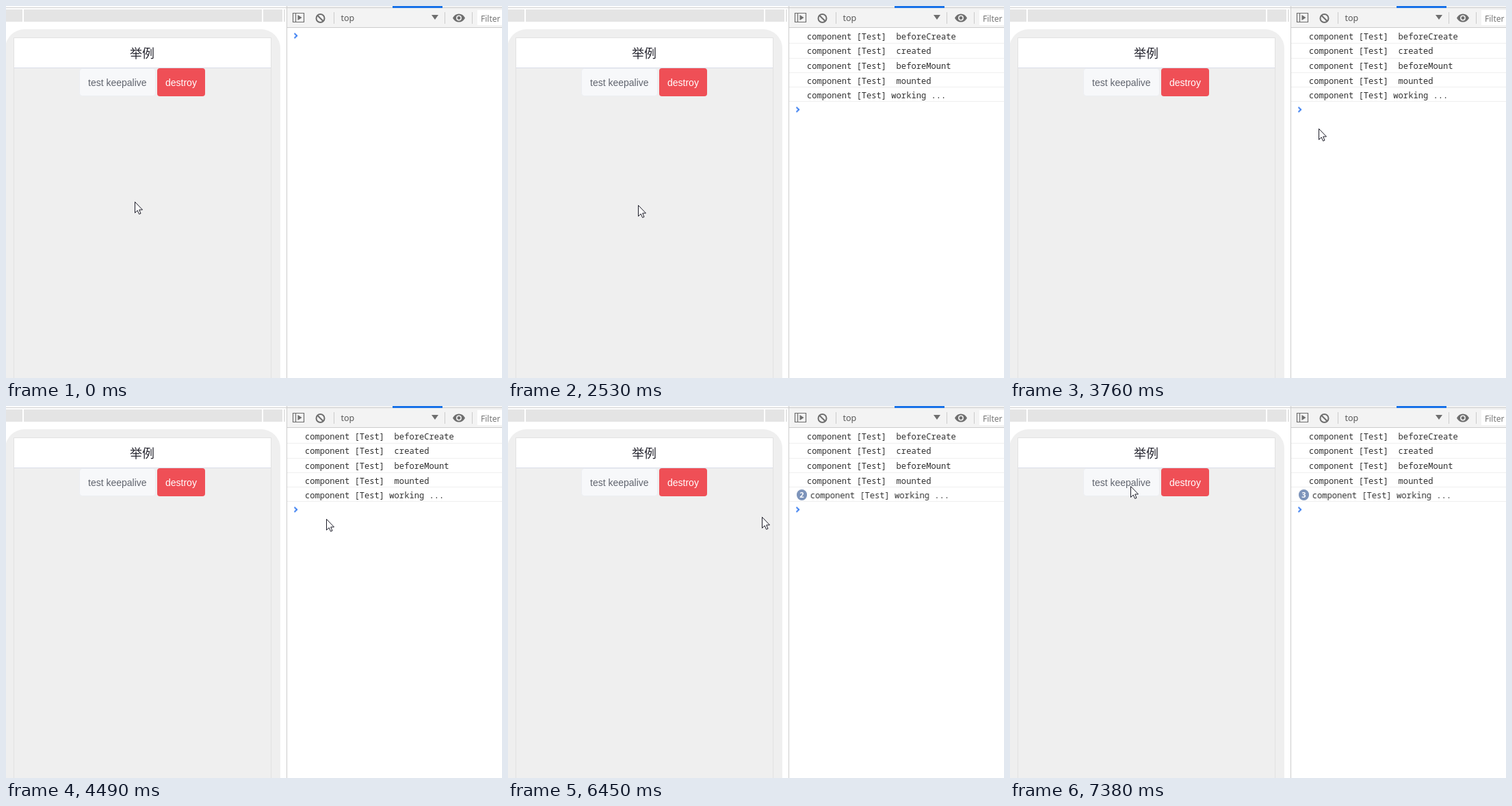
These frames come from a looping animation (725 px wide and 544 px high, 8000 ms). An HTML page:

```html
<!DOCTYPE html>
<html lang="zh-CN">
<head>
<meta charset="utf-8">
<title>Keep-alive demo</title>
<style>
html, body { margin: 0; width: 100%; height: 100%; overflow: hidden; background: #fff; }
svg { display: block; width: 725px; height: 544px; }
text { white-space: pre; }
.btn { font: 14px "Liberation Sans", Arial, sans-serif; }
.title { font: 300 18px "Noto Sans CJK SC", "Noto Sans CJK", sans-serif; fill: #25252f; }
.bar { font: 12.5px "Noto Sans", sans-serif; fill: #5a5a5a; }
.log { font: 12.1px "Noto Sans Mono", monospace; fill: #303030; }
.badge { font: bold 11px "Noto Sans", sans-serif; fill: #fff; text-anchor: middle; }
.rule { stroke: #efefef; }
.icon { fill: none; stroke: #6e6e6e; }

/* every part shares one 8 s clock and changes in hard steps */
.step { animation: 8s step-end infinite; }
#mount { animation-name: mount; }
#work { animation-name: work; }
#shift { animation-name: shift; }
#count { animation-name: count; }
#two { animation-name: two; }
#three { animation-name: three; }
#prompt { animation-name: prompt; }
#cursor { animation-name: cursor; }

@keyframes mount { 0% { opacity: 0 } 1.5%, 100% { opacity: 1 } }
@keyframes work { 0% { opacity: 0 } 31.625%, 100% { opacity: 1 } }
@keyframes shift { 0% { transform: none } 60.75%, 100% { transform: translateX(4.7px) } }
@keyframes count { 0% { opacity: 0 } 60.75%, 100% { opacity: 1 } }
@keyframes two { 0% { opacity: 1 } 92.25%, 100% { opacity: 0 } }
@keyframes three { 0% { opacity: 0 } 92.25%, 100% { opacity: 1 } }
@keyframes prompt {
  0% { transform: translateY(43.5px) }
  1.5% { transform: translateY(129.5px) }
  31.625%, 100% { transform: translateY(151.5px) }
}
@keyframes cursor {
  0% { transform: translate(188px, 286px) }
  1.5% { transform: translate(190px, 291px) }
  33.5% { transform: translate(209px, 274px) }
  35.375% { transform: translate(228px, 262px) }
  36.875% { transform: translate(244px, 251px) }
  38.75% { transform: translate(267px, 235px) }
  40.625% { transform: translate(313px, 214px) }
  42.125% { transform: translate(372px, 196px) }
  43.625% { transform: translate(420px, 185px) }
  45.375% { transform: translate(438px, 181px) }
  47% { transform: translate(451px, 179px) }
  48.875% { transform: translate(468px, 179px) }
  50.75% { transform: translate(470px, 166px) }
  56.125% { transform: translate(468px, 165px) }
  57.625% { transform: translate(466px, 165px) }
  80.625% { transform: translate(371px, 162px) }
  82.5% { transform: translate(322px, 143px) }
  84% { transform: translate(279px, 129px) }
  85.75% { transform: translate(236px, 121px) }
  87.25% { transform: translate(205px, 118px) }
  88.875% { transform: translate(187px, 117px) }
  90.375% { transform: translate(177px, 117px) }
  92.25%, 100% { transform: translate(176px, 117px) }
}
</style>
</head>
<body>
<svg viewBox="0 0 725 544">
  <!-- device preview -->
  <path d="M0 2.5H410" stroke="#d0d0d0"/>
  <path d="M0 5h24v18H0zM26 5h348v18H26zM376 5h28v18h-28zM406 5h2v18h-2z" fill="#e4e4e4"/>
  <rect x="-1" y="34" width="402" height="560" rx="28" fill="#efefef"/>
  <rect x="11.5" y="46.5" width="376" height="540" fill="#efefef" stroke="#e2e2e2"/>
  <path d="M12 47h375v43H12z" fill="#fff"/>
  <path d="M12 90.5h375" stroke="#d9dce8"/>
  <text class="title" x="181" y="76">举例</text>
  <rect x="107.5" y="91.5" width="111" height="40" rx="4" fill="#f7f8fa" stroke="#eceef2"/>
  <text class="btn" x="120" y="117" fill="#60646e">test keepalive</text>
  <rect x="221" y="91" width="70" height="41" rx="4" fill="#ef4f56"/>
  <text class="btn" x="233" y="117" fill="#fff">destroy</text>

  <!-- console toolbar -->
  <path d="M411 0h314v31H411z" fill="#f3f3f3"/>
  <path d="M411 2.5h314M411 31.5h314M410.5 0v544" stroke="#ccc"/>
  <path d="M565 0h73v3h-73z" fill="#1a73e8"/>
  <path class="icon" d="M419.5 10.5h16v13h-16zM423.5 10.5v13" stroke-width="1.2"/>
  <path d="M426.5 13l6 4-6 4z" fill="#6e6e6e"/>
  <circle class="icon" cx="459.5" cy="18" r="6" stroke-width="2"/>
  <path class="icon" d="M455.2 13.7l8.6 8.6" stroke-width="2"/>
  <path d="M479.5 9v17M641.5 9v17M681.5 9v17" stroke="#ccc"/>
  <text class="bar" x="489.5" y="22">top</text>
  <path d="M622 13h10l-5 7z" fill="#6e6e6e"/>
  <path d="M653 17.5Q656 11.5 662 11.5T671 17.5Q668 23.5 662 23.5T653 17.5z" fill="#6e6e6e"/>
  <circle cx="662" cy="17.5" r="3.2" fill="#6e6e6e" stroke="#f3f3f3" stroke-width="1.5"/>
  <path d="M689 6h36v22h-36z" fill="#fff"/>
  <text class="bar" x="694" y="23" style="font-size:12px;fill:#757575">Filter</text>

  <!-- console output -->
  <g id="mount" class="step">
    <path class="rule" d="M411 54.5h314M411 76.5h314M411 97.5h314M411 118.5h314"/>
    <text class="log" x="437" y="49">component [Test]  beforeCreate</text>
    <text class="log" x="437" y="70">component [Test]  created</text>
    <text class="log" x="437" y="92">component [Test]  beforeMount</text>
    <text class="log" x="437" y="114">component [Test]  mounted</text>
  </g>
  <g id="work" class="step">
    <path class="rule" d="M411 139.5h314"/>
    <text id="shift" class="log step" x="437" y="135">component [Test] working ...</text>
  </g>
  <g id="count" class="step">
    <rect x="422" y="122" width="15" height="16" rx="7.5" fill="#7d94bb"/>
    <text id="two" class="badge step" x="429.5" y="134">2</text>
    <text id="three" class="badge step" x="429.5" y="134">3</text>
  </g>
  <path id="prompt" class="step" d="M421.5 -3.5l3.8 3.5-3.8 3.5" fill="none" stroke="#367cf1" stroke-width="1.8"/>

  <path id="cursor" class="step" d="M.5.5V16.5L4.2 13 6.6 18.4 9 17.4 6.7 12H11.5z" fill="#fff" stroke="#1c1c28"/>
</svg>
</body>
</html>
```
